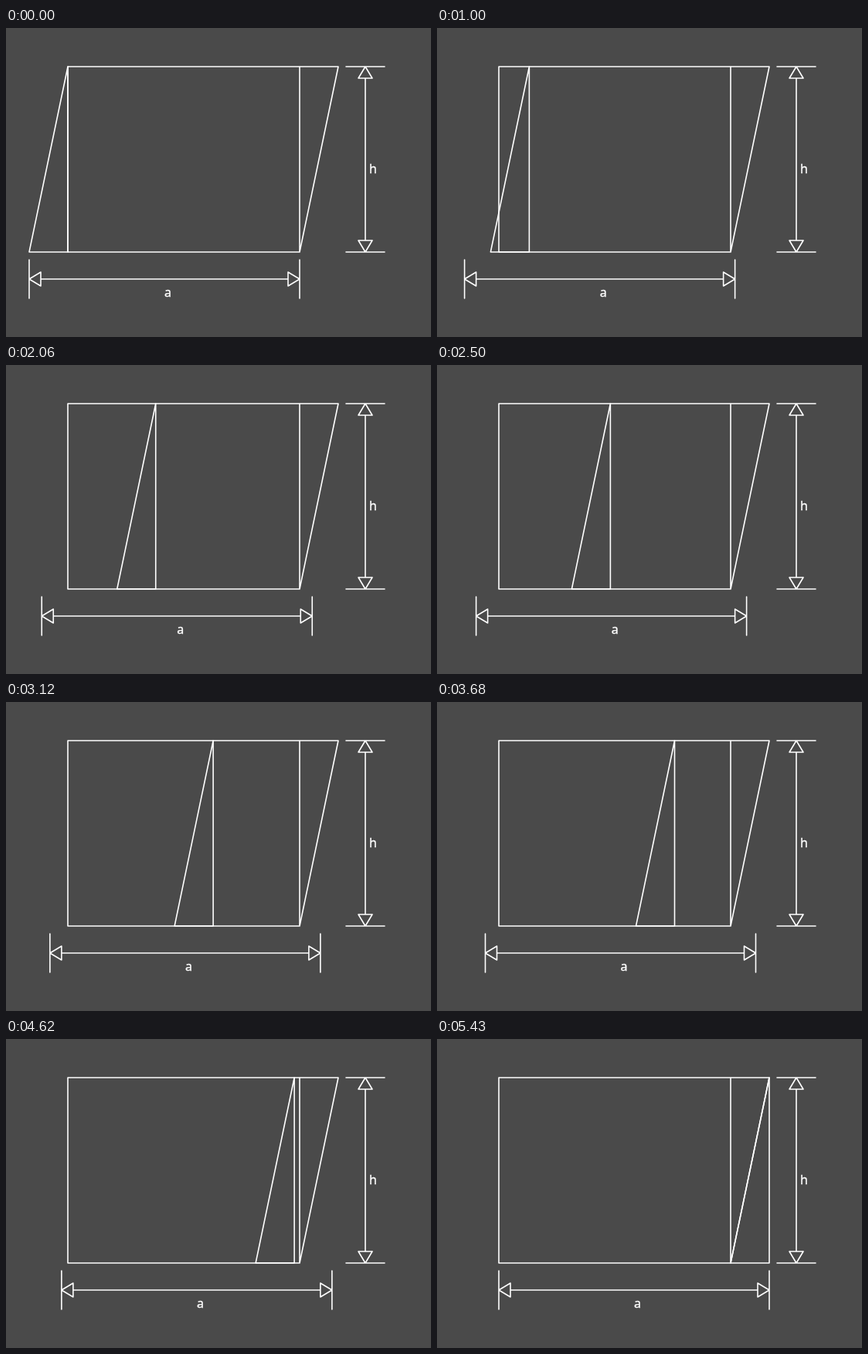
Animation, 550 px wide and 400 px high, one loop 8 s. Source, as an HTML page:

```html
<!DOCTYPE html>
<html lang="en">
<head>
<meta charset="utf-8">
<title>Area of a parallelogram</title>
<style>
  html, body { margin: 0; width: 100%; height: 100%; overflow: hidden; background: #4a4a4a; }
  svg { display: block; width: 550px; height: 400px; }
  path { fill: none; stroke: #fff; stroke-width: 1.6; stroke-linejoin: round; stroke-linecap: round; }
  text { fill: #fff; stroke: #fff; stroke-width: .35; font: 16px "Noto Sans", "Open Sans", sans-serif; text-anchor: middle; }
</style>
</head>
<body>
<svg viewBox="0 0 550 400">
  <!-- fixed part of the parallelogram -->
  <path d="M80 290V50H430L380 290ZM380 50V290"/>
  <!-- height -->
  <path d="M440 50H490M440 290H490M465 65V275M465 50L474 65H456ZM465 290L474 275H456Z"/>
  <text x="475" y="188">h</text>
  <!-- triangle that moves across -->
  <path id="tri" d="M80 50V290H30Z"/>
  <!-- base length -->
  <g id="base">
    <path d="M30 300V350M380 300V350M45 325H365M30 325L45 316V334ZM380 325L365 316V334Z"/>
    <text x="209.5" y="348">a</text>
  </g>
</svg>
<script>
  const LOOP = 8000, START = 500, STEP = 62.5, STEPS = 80;
  const tri = document.getElementById("tri");
  const base = document.getElementById("base");

  // Step times fall on whole hundredths of a second.
  const stepTime = k => Math.floor((START + (k - 1) * STEP) / 10) * 10;

  function stepAt(t) {
    let k = Math.max(0, Math.min(STEPS, Math.floor((t - START) / STEP) + 1));
    if (k < STEPS && t >= stepTime(k + 1)) k++;
    return k;
  }

  const shift = (el, x) => el.setAttribute("transform", `translate(${x} 0)`);

  function draw(t) {
    const p = stepAt(t) / STEPS;
    shift(tri, 350 * p);
    shift(base, 50 * p);
  }

  const began = performance.now();
  function tick() {
    draw((performance.now() - began) % LOOP);
    requestAnimationFrame(tick);
  }
  draw(0);
  requestAnimationFrame(tick);
</script>
</body>
</html>
```
